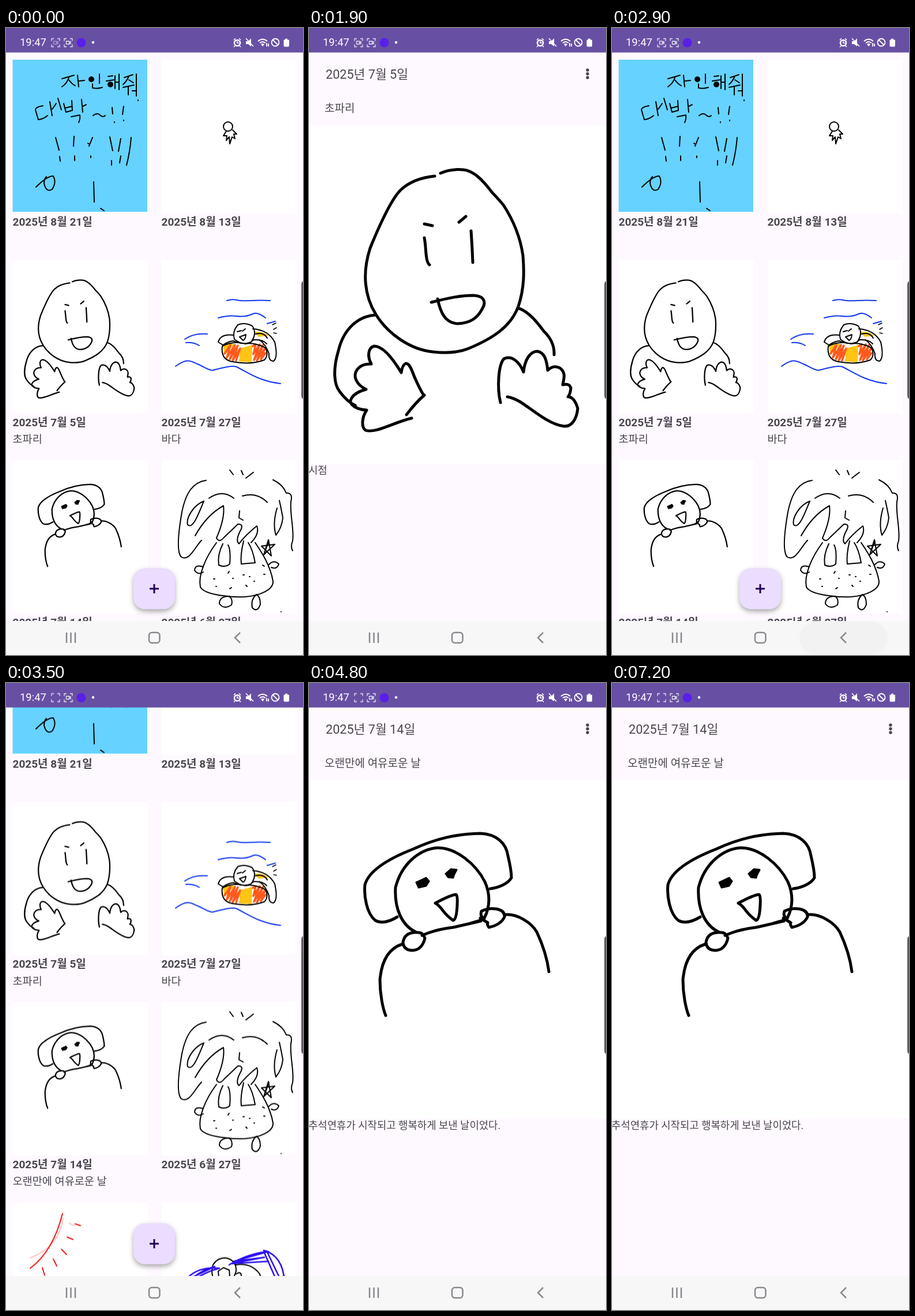
These frames come from a looping animation (515x1088 px, 8000 ms). An HTML page:

```html
<!DOCTYPE html>
<html lang="ko">
<head>
<meta charset="utf-8">
<title>그림일기</title>
<style>
  html, body { margin: 0; width: 100%; height: 100%; overflow: hidden; background: #1a0050; }
  svg { display: block; width: 100vw; height: 100vh; font-family: Roboto, "Noto Sans CJK KR", "Noto Sans CJK", sans-serif; }
  text { fill: #49454f; }
  .date { font-size: 19px; font-weight: 700; }
  .note { font-size: 18.6px; }
  .title { font-size: 21.6px; }
  .subtitle { font-size: 19px; }
  .body { font-size: 17.8px; }
  .clock { font-size: 18.4px; fill: #fff; }
  .ink, .thin { fill: none; stroke: #000; stroke-linecap: round; stroke-linejoin: round; }
  .ink { stroke-width: 5; }
  .thin { stroke-width: 2; }
  .fab { filter: drop-shadow(0 4px 4px #0005); }

  /* Every animation is paused and placed by --t, a clock that ticks ten times a second. */
  .anim { animation: 8s linear infinite paused; animation-delay: var(--t, 0ms); }
  #list { animation-name: list; }
  #scroll { animation-name: scroll; }
  #first { animation-name: first; }
  #second { animation-name: second; }
  #pill { animation-name: pill; }
  #recFade { animation-name: recFade; }
  #rec { animation-name: blink; animation-duration: 1s; }

  @keyframes list {
    0%, 15% { transform: translateY(0); }
    16.25% { transform: translateY(-8.5px); }
    17.5% { transform: translateY(-16px); }
    18.75%, 28.75% { transform: translateY(-20px); }
    30% { transform: translateY(-12px); }
    31.25% { transform: translateY(-4px); }
    32.5%, 52.5% { transform: translateY(0); }
    53.75% { transform: translateY(-8.5px); }
    55% { transform: translateY(-16px); }
    56.25%, 100% { transform: translateY(-20px); }
  }
  @keyframes scroll {
    0%, 37.5% { transform: translateY(0); animation-timing-function: cubic-bezier(.3, .2, .3, 1); }
    48.75%, 100% { transform: translateY(-233px); }
  }
  @keyframes first {
    0%, 15% { opacity: 0; transform: translateY(300px); }
    16.25% { opacity: .75; transform: translateY(151px); }
    17.5% { opacity: 1; transform: translateY(62px); }
    18.75% { opacity: 1; transform: translateY(26px); }
    20% { opacity: 1; transform: translateY(10px); }
    21.25% { opacity: 1; transform: translateY(4px); }
    22.5%, 28.75% { opacity: 1; transform: translateY(0); }
    30% { opacity: .65; transform: translateY(40px); }
    31.25% { opacity: .2; transform: translateY(110px); }
    32.5%, 100% { opacity: 0; transform: translateY(150px); }
  }
  @keyframes second {
    0%, 52.5% { opacity: 0; transform: translateY(300px); }
    53.75% { opacity: .75; transform: translateY(151px); }
    55% { opacity: 1; transform: translateY(62px); }
    56.25% { opacity: 1; transform: translateY(26px); }
    57.5% { opacity: 1; transform: translateY(10px); }
    58.75% { opacity: 1; transform: translateY(4px); }
    60%, 100% { opacity: 1; transform: translateY(0); }
  }
  @keyframes pill {
    0%, 26.25% { opacity: 0; }
    28.75%, 35% { opacity: 1; }
    36.25% { opacity: .8; }
    37.5%, 100% { opacity: 0; }
  }
  @keyframes recFade {
    0% { opacity: .5; }
    2.5%, 89% { opacity: 1; }
    89.01%, 100% { opacity: 0; }
  }
  @keyframes blink {
    0%, 35% { opacity: 1; }
    35.01%, 85% { opacity: 0; }
    85.01%, 100% { opacity: 1; }
  }
</style>
</head>
<body>
<svg viewBox="0 0 515 1088" preserveAspectRatio="none">
  <defs>
    <g id="bars">
      <path fill="#6750a4" d="M0 0h515v42.500H0z"/>
      <path fill="#f7f7f8" d="M0 1029h515v59H0z"/>
    </g>
    <g id="page">
      <path fill="#fef8ff" d="M0 0h515v1088H0z"/>
      <path fill="#fff" d="M0 169h515v587H0z"/>
      <use href="#bars"/>
      <g fill="#49454f"><circle cx="483" cy="73" r="2.7"/><circle cx="483" cy="79.5" r="2.7"/><circle cx="483" cy="86" r="2.7"/></g>
    </g>
    <path id="card" fill="#fff" d="M0 0h234v266H0z"/>
    <path id="brackets" d="M0 4V0h4M10 0h4v4M14 10v4h-4M4 14H0v-4"/>
    <path id="camera" d="M3.5 4.5h5v5h-5zM8.500 6.500l2.500-1.500v4l-2.500-1.500"/>

    <g id="fly" class="ink">
      <path d="M218 257Q180 261 159 281C140 300 117 355 106 382C92 425 96 465 116 497C136 530 175 558 215 562C240 565 262 562 277 556C320 538 350 518 363 483C374 450 373 420 371 395C366 360 352 330 337 307Q326 294 318 286C300 262 285 248 268 246Q245 244 228 252"/>
      <path d="M200 340L214 343M260 337L272 327M200 364C203 380 202 395 205 404Q207 410 209 411M281 352Q283 380 284 407"/>
      <path d="M212 476C240 469 262 464 285 464C302 465 306 473 303 482C296 498 285 512 258 513C236 512 228 494 223 470"/>
      <path d="M115 498C85 500 60 522 51 560C42 590 42 618 54 632Q66 648 80 655"/>
      <path d="M80 655Q68 652 74 642Q80 632 99 627C84 620 74 605 84 592Q92 582 108 583C101 570 102 555 113 552C130 552 148 578 160 598Q162 584 168 582C176 582 180 600 184 608Q192 626 198 636L200 637Q185 650 169 671"/>
      <path d="M74 653Q82 662 100 663C92 675 90 692 98 698C115 704 145 685 178 677M362 486C378 490 394 508 407 526Q426 544 425 567"/>
      <path d="M332 650C326 625 328 585 338 574C350 568 364 577 372 597C374 575 384 561 396 561C408 563 412 575 414 594Q424 584 435 590C446 598 442 608 440 619Q452 616 454 625Q453 636 449 640Q460 640 466 660C464 680 455 692 442 691C415 688 385 660 365 648Q352 641 344 640"/>
    </g>

    <g id="bonnet" class="ink">
      <path d="M153 406Q130 420 115 412C100 400 95 370 97 350C104 325 140 304 181 288C220 270 255 262 297 261C325 262 342 278 345 300Q351 325 351 338C345 348 330 355 314 357"/>
      <path d="M185 432C160 420 148 390 150 355C160 315 190 289 222 286C255 285 290 315 305 345C316 370 313 390 304 408"/>
      <path d="M196 438L206 434Q225 427 250 424L298 413M280 417L297 412"/>
      <path d="M190 433Q166 431 163 450Q164 464 180 464Q196 463 201 443Q198 433 190 433M304 408Q296 406 299 396Q310 390 325 392Q340 395 339 406Q332 420 312 424Q308 418 310 416L297 408"/>
      <path d="M219 382Q245 368 255 367Q258 368 257 385Q256 410 250 412Q240 405 233 396Q225 385 219 382"/>
      <path fill="#000" stroke-width="3" d="M186 346L203 338L208 344L203 352L190 355zM237 331L246 323L256 324L251 334L250 338L241 337z"/>
      <path d="M162 453C140 460 126 480 123 515C123 540 128 565 133 577M340 402C360 400 385 415 395 432C408 460 414 485 416 501"/>
    </g>

    <g id="letter" class="thin">
      <path fill="#66d2ff" stroke="none" d="M11.500 55h233.500v264H11.500z"/>
      <path d="M97 88L118 82M109 86Q106 96 97 102M109 90Q115 98 120 100M124 82L126 102M126 92L136 91M162 80V96M150 97V104Q158 106 167 103"/>
      <path fill="#000" d="M144 89a4 4 0 1 1 8 0a4 4 0 1 1-8 0M177 98a4 4 0 1 1 8 0a4 4 0 1 1-8 0"/>
      <path d="M177 84l8-1M174 92L187 90M189 83V105M189 94h6M196 80V107M205 86L220 81M213 84Q208 94 203 98M213 90L221 95M203 103L222 99M212 102V116M226 80V118M219 109h7M229 125v1"/>
      <path d="M64 135Q51 137 51 142L56 159Q65 158 72 152M76 128L80 152M80 141L87 131M90 122L96 142M100 131L104 146L115 143L114 126M102 139L114 136M131 124L133 146M133 136L139 133M113 154L128 151Q129 158 126 164"/>
      <path d="M151 152Q158 146 163 151T172 152M184 138L185 149M188 163v1M204 136L202 150M204 160v1M86 190L92 212M93 223l1 8M118 188L117 205M119 222v8M150 190L144 205M147 222v3M142 200l3 2"/>
      <path d="M180 189L185 213M183 230v8M199 192L195 214M199 222L197 234M217 190Q215 215 209 238M52 276Q72 256 82 257Q88 268 80 280Q70 286 66 270Q66 262 70 258M152 267L153 302M164 313L170 317"/>
    </g>

    <g id="squid" class="thin">
      <circle cx="385" cy="171" r="8"/>
      <path d="M382 179L377 187L383 187L382 195L387 189L388 201L392 189L397 192L395 184L400 184L393 177"/>
    </g>

    <g id="sea" class="thin">
      <path stroke="#1236f0" d="M383 473Q392 470 400 472T425 473T458 473M368 503Q385 498 400 500T428 496Q436 492 450 503M453 513l14-4M349 531Q325 529 310 540M312 546Q325 545 335 551M294 587C315 572 320 578 332 583S350 594 358 594C375 590 390 585 400 588C420 598 440 613 476 617"/>
      <path fill="#ffc414" stroke="none" d="M376 551Q386 544 396 549L379 568zM406 556L427 550L426 580L404 579zM430 527Q447 526 455 534L438 536z"/>
      <path stroke="#ff5a1c" stroke-width="3.500" d="M379 565L389 550L383 572L397 550L388 575L402 551L393 577L406 556L399 577M428 552L433 549L429 566L440 549L430 576L446 550L435 577L449 556L442 575L450 564"/>
      <path d="M375 552Q372 575 392 579Q425 585 448 576Q456 568 450 555Q430 545 415 548Q395 542 375 552M395 533Q372 530 368 545L376 550Q385 544 394 543Q415 552 430 541Q445 540 452 548"/>
      <path fill="#fff" d="M402 515Q392 527 396 540Q410 552 425 545Q436 530 427 517Q414 510 402 515"/>
      <path d="M428 522Q455 524 466 545Q472 572 464 578Q455 578 456 565Q450 548 439 541M433 531Q447 527 453 538M401 527l7-2M415 522l-5 4M405 536L416 532Q415 541 411 542z"/>
      <path stroke-width="1.500" d="M462 515l6-3M464 523l5-3M464 529l5 1"/>
    </g>

    <g id="peak" class="thin">
      <path d="M388 767l6 8M408 768l3 7M429 771L416 781M347 785C325 788 312 805 305 840C298 880 296 910 304 918C318 926 328 900 339 889M463 784Q480 792 486 807Q498 806 494 822C492 845 500 870 497 890Q493 900 497 907"/>
      <path d="M343 821C325 828 312 850 315 862C324 870 333 845 343 821M352 816Q375 800 395 816M410 812Q435 805 453 823M328 881Q348 845 377 829Q380 850 365 885Q370 894 378 884L402 861Q414 860 405 875Q398 890 404 895Q415 880 435 864Q440 878 425 893M405 838L404 850L411 854"/>
      <path d="M470 833Q462 860 468 880Q478 868 480 850Q478 838 474 820M376 895Q366 915 369 932Q380 937 388 930Q390 905 385 897M412 890Q406 915 408 930L432 928Q428 905 420 893M365 893C345 920 333 950 337 970C345 985 395 988 415 987C440 985 464 975 463 960C458 930 440 905 432 893"/>
      <path d="M342 935Q328 930 327 941Q333 950 342 944M456 931Q464 922 473 930Q470 940 460 936M387 986Q370 986 370 999Q378 1010 391 1001Q394 992 387 986M434 983Q424 992 427 1006Q436 1015 441 1000Q441 986 434 983M447 914L455 888L460 916L443 899L466 896L447 914L456 890"/>
      <path d="M360 956h2M364 969h1M387 943l-2 3M411 949h2M393 955h1M422 952h1M388 973l3-2M416 967l2 2M430 960h1M447 948h2M445 932l3 2M477 1013h0"/>
    </g>

    <g id="sun" class="thin">
      <path stroke="#ffc4c4" d="M99 1125Q92 1175 42 1194M110 1134l8 4"/>
      <path stroke="#f01414" d="M98 1117Q82 1182 42 1212M120 1135l9 3M106 1158l10 4M96 1179l9 9M82 1196l6 12M63 1211l4 13M153 1259Q165 1250 182 1254Q190 1257 189 1264"/>
    </g>

    <g id="wings" class="thin">
      <path d="M359 1206Q366 1194 381 1194Q400 1198 399 1217Q392 1242 370 1239Q352 1228 359 1206M368 1217l9-6l10 4l1 10l-9 6l-10-3zM399 1206Q425 1202 440 1222Q450 1252 428 1257M399 1222Q408 1216 408 1226Q404 1236 393 1232M339 1259Q350 1247 365 1243"/>
      <path stroke="#2a0cf0" stroke-width="2.500" d="M302 1260Q320 1220 362 1209L310 1234Q330 1208 370 1212Q325 1224 306 1255M387 1206Q420 1186 455 1183L395 1200L448 1193L390 1204L455 1200M447 1181Q480 1190 483 1235L460 1244L480 1226L465 1240M447 1183L472 1240M452 1182L479 1238"/>
    </g>
  </defs>

  <g id="list" class="anim">
    <path fill="#fef8ff" d="M0 0h515v1088H0z"/>
    <g id="scroll" class="anim">
      <g id="cards"></g>
      <use href="#letter"/><use href="#squid"/><use href="#sea"/><use href="#peak"/><use href="#sun"/><use href="#wings"/>
      <use href="#fly" transform="translate(12.200 402.800) scale(.451) translate(0 -169)"/>
      <use href="#bonnet" transform="translate(12.200 750.300) scale(.451) translate(0 -169)"/>
    </g>
    <rect class="fab" x="221" y="937.500" width="72" height="71" rx="20" fill="#eaddff"/>
    <path stroke="#21005d" stroke-width="3" d="M249 973h16M257 965v16"/>
    <use href="#bars"/>
  </g>

  <g id="first" class="anim">
    <use href="#page"/><use href="#fly"/>
    <text class="title" x="29" y="88">2025년 7월 5일</text>
    <text class="subtitle" x="27" y="146">초파리</text>
    <text class="body" x="-1" y="774">시점</text>
  </g>

  <g id="second" class="anim">
    <use href="#page"/><use href="#bonnet"/>
    <text class="title" x="29" y="88">2025년 7월 14일</text>
    <text class="subtitle" x="27" y="146">오랜만에 여유로운 날</text>
    <text class="body" x="-1" y="774">추석연휴가 시작되고 행복하게 보낸 날이었다.</text>
  </g>

  <rect id="pill" class="anim" x="325" y="1030" width="153" height="57" rx="28" fill="#f1f1f2"/>
  <g fill="none" stroke="#8a888d" stroke-width="2.500">
    <path d="M105 1049v18M112.500 1049v18M120 1049v18M406 1049l-9 9l9 9"/>
    <rect x="248" y="1049" width="18.500" height="18" rx="5"/>
  </g>

  <text class="clock" x="24" y="31">19:47</text>
  <g fill="none" stroke="#fff" stroke-width="1.300">
    <g transform="translate(79 18.500)" opacity=".85"><use href="#brackets"/><g id="recFade" class="anim"><use id="rec" class="anim" href="#camera"/></g></g>
    <g transform="translate(101 18.500)" opacity=".85"><use href="#brackets"/><use href="#camera"/></g>
    <circle cx="401" cy="26" r="5" stroke-width="2.500"/>
    <path stroke-width="1.600" d="M401 23v3h3M395 21l3-3M407 21l-3-3M397 31l-2 2M405 31l2 2M416 18l13 14"/>
    <path stroke-width="1.800" d="M437 23Q445 16 453 23M440 26Q445 22 450 26M452 26v6M455 27v5"/>
    <circle cx="467" cy="25" r="6.500" stroke-width="1.800"/>
    <path stroke-width="1.800" d="M462.500 20.500l9 9"/>
  </g>
  <g fill="#fff">
    <path d="M416 23h4l5-5v14l-5-4h-4zM442 28q3-2 6 0l-3 4zM481.500 20.500h2.500v-2h4v2h3v10q0 2-2 2h-5.500q-2 0-2-2z"/>
    <circle cx="151" cy="25" r="2.200"/>
  </g>
  <circle cx="130.500" cy="25.500" r="8" fill="#5a20e6"/>
  <path fill="#59575b" stroke="#b5b3b7" stroke-width=".7" d="M516 439q-4 1-4 6v193q0 5 4 6z"/>
</svg>
<script>
  const entries = [
    ['2025년 8월 21일'], ['2025년 8월 13일'],
    ['2025년 7월 5일', '초파리'], ['2025년 7월 27일', '바다'],
    ['2025년 7월 14일', '오랜만에 여유로운 날'], ['2025년 6월 27일'],
    [''], ['']
  ];
  document.getElementById('cards').innerHTML = entries.map(([date, note = ''], i) => {
    const x = i % 2 ? 270 : 12;
    const y = 55 + 347.5 * Math.floor(i / 2);
    return `<use href="#card" x="${x}" y="${y}"/>
      <text class="date" x="${x - .5}" y="${y + 288}">${date}</text>
      <text class="note" x="${x - .5}" y="${y + 317.5}">${note}</text>`;
  }).join('');

  const start = performance.now();
  function tick() {
    const time = Math.floor((performance.now() - start) / 100) * 100 % 8000;
    document.documentElement.style.setProperty('--t', -time + 'ms');
    requestAnimationFrame(tick);
  }
  tick();
</script>
</body>
</html>
```
